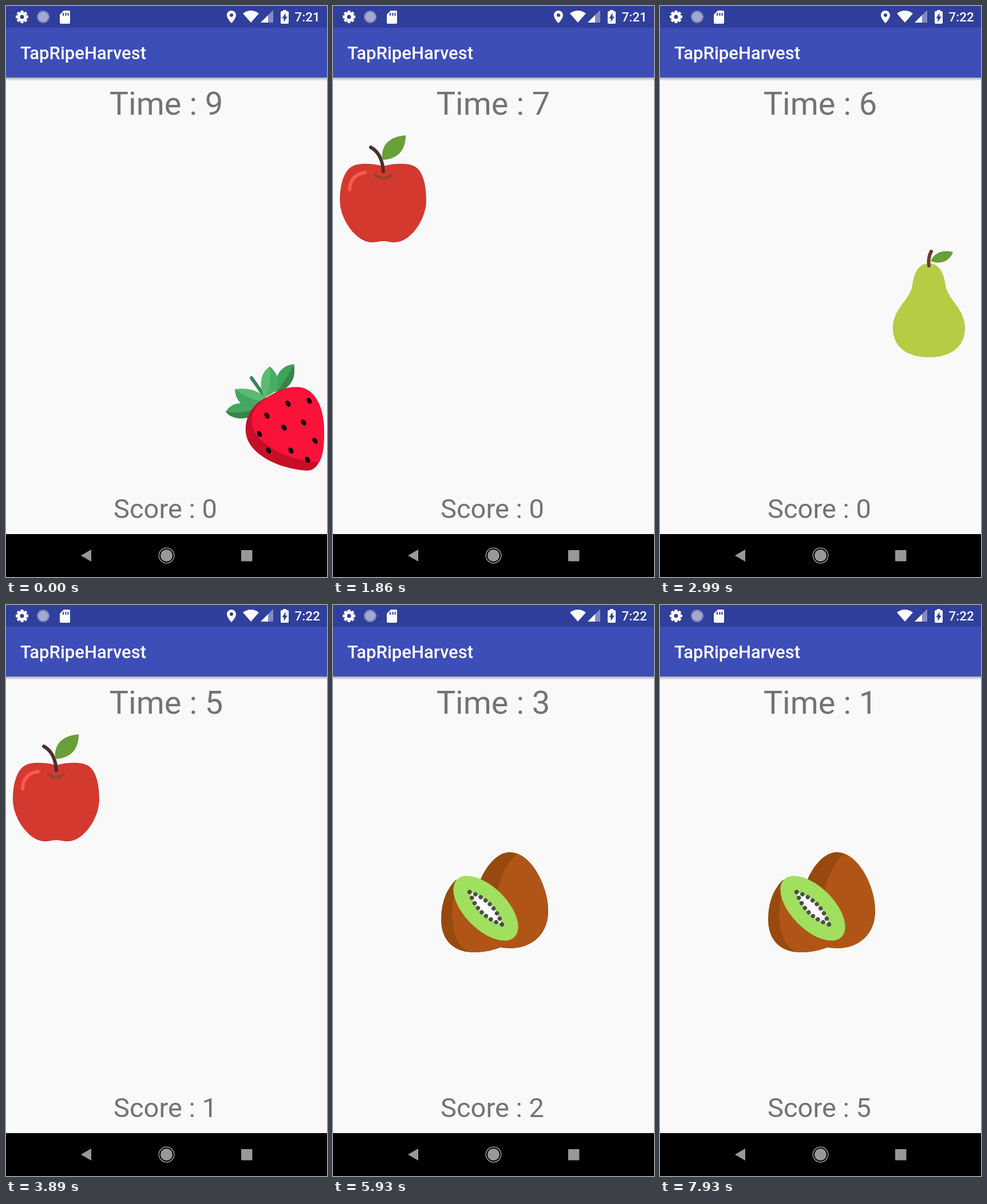
These frames come from a looping animation (561x998 px, 8 s). An HTML page:

```html
<!DOCTYPE html>
<html lang="en">
<head>
<meta charset="utf-8">
<title>Fruit tapping game</title>
<style>
  html, body { margin: 0; width: 100%; height: 100%; overflow: hidden; background: #f9f9fa; }
  svg { display: block; width: 100vw; height: 100vh; }
  text { font-family: Roboto, sans-serif; }
  .line { fill: none; stroke-linecap: round; }
  .fruit { display: none; }
</style>
</head>
<body>
<svg viewBox="0 0 561 998">
  <defs>
    <linearGradient id="shade" x2="0" y2="1">
      <stop offset="0" stop-color="#000" stop-opacity=".3"/>
      <stop offset="1" stop-color="#000" stop-opacity="0"/>
    </linearGradient>
  </defs>
  <rect width="561" height="998" fill="#f9f9fa"/>
  <rect y="125" width="561" height="6" fill="url(#shade)"/>
  <rect width="561" height="125" fill="#3d4eb8"/>
  <rect width="561" height="38" fill="#303f9b"/>

  <g id="status" fill="#fff">
    <g id="gear" transform="translate(28 19)">
      <circle r="6" fill="none" stroke="#fff" stroke-width="5"/>
    </g>
    <circle cx="65" cy="19" r="9" fill="#a3aace"/>
    <circle cx="65" cy="19" r="10" fill="none" stroke="#d6d9e9" stroke-width="1.6" stroke-dasharray="1.6 1.4"/>
    <path d="M101 8H110Q112 8 112 10V29Q112 31 110 31H96Q94 31 94 29V15Z"/>
    <path d="M100 12v5M104.500 12v5M108.500 12v5" stroke="#303f9b" stroke-width="2"/>
    <path id="pin" fill-rule="evenodd" d="M394 8C389 8 386 12 386 16C386 22 394 30 394 30S402 22 402 16C402 12 399 8 394 8ZM394 13a3 3 0 1 1 0 6a3 3 0 1 1 0-6Z"/>
    <path d="M414 13Q428 3 442 13L428 29Z"/>
    <path d="M467 7V29H445Z" opacity=".4"/>
    <path d="M458 16V29H445Z"/>
    <path d="M484 7h6v2h2q2 0 2 2v18q0 2-2 2h-10q-2 0-2-2v-18q0-2 2-2h2Z"/>
    <path d="M488.500 12V18.500H492L485.500 28V21.500H482.500Z" fill="#303f9b"/>
    <text id="clock" x="504.500" y="27" font-size="22.500" font-weight="500"></text>
  </g>
  <text x="25" y="93" font-size="31" font-weight="500" fill="#fff">TapRipeHarvest</text>

  <g fill="#737373" text-anchor="middle">
    <text id="time" x="280" y="190" font-size="56"></text>
    <text id="score" x="278.500" y="895" font-size="47"></text>
  </g>

  <g id="apple" class="fruit">
    <path fill="#d3392f" d="M88 280C70 275 45 274 34 280C18 288 12 315 12 340C12 372 40 413 68 413C78 413 80 411 88 411C96 411 98 413 108 413C136 413 163 372 163 340C163 315 158 288 142 280C130 274 105 275 88 280Z"/>
    <g class="line" stroke-width="6">
      <path stroke="#ff594f" d="M29 321Q30 295 56 291"/>
      <path stroke="#98432f" stroke-width="5" d="M74 296Q88 306 101 296"/>
      <path stroke="#4b2e2a" d="M66 247Q86 258 88 289"/>
    </g>
    <path fill="#689f38" d="M86 269C83 240 102 228 127 226C127 250 115 268 86 269Z"/>
  </g>

  <g id="strawberry" class="fruit">
    <path class="line" stroke="#388558" stroke-width="6" d="M429 650L449 678"/>
    <path fill="#3fa35c" d="M470 675C468 640 485 628 503 626C507 645 500 662 486 670Z"/>
    <path fill="#368549" d="M503 626C507 645 500 662 486 670L474 674Q490 652 503 626Z"/>
    <path fill="#44a660" d="M384 709C395 692 415 690 434 702L424 719C408 723 392 720 384 709Z"/>
    <path fill="#368549" d="M384 709Q410 713 432 706L424 719C408 723 392 720 384 709Z"/>
    <path fill="#58bd6e" d="M400 670C425 665 445 675 457 686L430 704C412 700 402 690 400 670Z"/>
    <path fill="#44a660" d="M400 670Q425 688 448 691L430 704C412 700 402 690 400 670Z"/>
    <path fill="#58bd6e" d="M461 630C475 642 482 660 468 675L452 685C440 660 446 640 461 630Z"/>
    <path fill="#48ad65" d="M461 630C475 642 482 660 468 675L456 682Q464 655 461 630Z"/>
    <path fill="#c50f28" d="M456 684C430 695 417 720 419 745C422 780 470 808 525 812C545 813 556 790 556 745C556 700 540 668 510 666C485 665 470 676 456 684Z"/>
    <path fill="#fa1238" d="M458 684C430 700 425 722 433 742C448 772 500 795 547 798C555 785 556 765 556 745C556 700 540 668 510 666C485 666 472 676 458 684Z"/>
    <g id="seeds"></g>
  </g>

  <g id="orange" class="fruit">
    <circle cx="90.500" cy="726" r="87" fill="#ea8c1f"/>
    <g id="spots" fill="#f2751d"></g>
    <path class="line" stroke="#94591a" stroke-width="6.500" d="M102 668L121 682M101 680L118 668"/>
    <path fill="#67a035" d="M116 671C125 640 145 622 185 627C180 650 160 676 116 671Z"/>
    <path class="line" stroke="#84bb4f" stroke-width="3.500" d="M119 669Q135 647 167 639"/>
  </g>

  <g id="grapes" class="fruit">
    <path class="line" stroke="#7c3b2a" stroke-width="7" style="stroke-linecap:butt" d="M162 430Q160 480 116 487"/>
    <path fill="#88c057" d="M149 474C172 472 189 490 189 513C165 512 150 495 149 474Z"/>
    <g id="berries"></g>
  </g>

  <g id="kiwi" class="fruit">
    <path fill="#984a0e" d="M309 432C345 432 376 490 376 535C376 575 348 600 309 600C275 600 245 580 245 535C245 490 275 432 309 432Z"/>
    <path fill="#b05517" d="M323 435C352 446 376 495 376 535C376 575 348 600 309 600C290 600 283 580 283 545C283 500 297 453 323 435Z"/>
    <path fill="#984a0e" d="M215 480C195 500 189 525 189 550C189 590 215 607 245 607C275 607 295 600 320 582Z"/>
    <path fill="#b05517" d="M217 492C207 515 206 545 212 570C217 590 225 600 240 607C275 608 300 598 322 582Z"/>
    <g id="slice" transform="translate(267 530) rotate(45)">
      <ellipse rx="71" ry="37" fill="#a1df5f"/>
      <path fill="#fbfaf8" d="M-40 0Q0-22 40 0Q0 22-40 0Z"/>
    </g>
  </g>

  <g id="pear" class="fruit">
    <path fill="#b5cc45" d="M470 450C488 450 496 466 499 488C503 514 533 528 533 563C533 596 508 614 470 614C432 614 407 596 407 563C407 528 437 514 441 488C444 466 452 450 470 450Z"/>
    <path class="line" stroke="#65402d" stroke-width="6" d="M470 454Q468 440 474 429"/>
    <path fill="#689f38" d="M473 446C480 430 495 426 512 430C506 447 490 452 473 446Z"/>
  </g>

  <rect y="923" width="561" height="75"/>
  <g fill="#989898">
    <path d="M131 960.500L149 950V971Z"/>
    <circle cx="280.500" cy="960.500" r="10.500"/>
    <circle cx="280.500" cy="960.500" r="13.300" fill="none" stroke="#989898" stroke-width="1.500"/>
    <rect x="411" y="951" width="19.500" height="19.500" rx="1"/>
  </g>
</svg>
<script>
const $ = id => document.getElementById(id);

function add(parent, tag, attrs) {
  const el = document.createElementNS("http://www.w3.org/2000/svg", tag);
  for (const key in attrs) el.setAttribute(key, attrs[key]);
  $(parent).append(el);
}

for (let a = 0; a < 360; a += 45)
  add("gear", "rect", { x: -2.5, y: -11, width: 5, height: 4, transform: `rotate(${a})` });

const seeds = [[456, 716], [493, 695], [530, 690], [486, 737], [520, 728],
  [443, 748], [540, 760], [459, 777], [498, 777], [527, 793]];
for (const [x, y] of seeds)
  add("seeds", "ellipse", { rx: 3.8, ry: 5.8, transform: `translate(${x} ${y}) rotate(-35)` });

const spots = [[50, 675], [75, 664], [140, 693], [158, 711], [137, 726], [160, 733], [140, 751]];
for (const [cx, cy] of spots) add("spots", "circle", { cx, cy, r: 7.3 });

const tones = ["#6a56a5", "#9575a8", "#583c62"];
const berries = [[48, 483, 0], [86, 482, 1], [129, 526, 2], [106, 502, 0], [35, 519, 2],
  [69, 515, 0], [96, 540, 2], [62, 545, 1], [28, 559, 0], [123, 560, 1],
  [89, 573, 0], [55, 583, 2], [22, 590, 1]];
for (const [cx, cy, tone] of berries)
  add("berries", "circle", { cx, cy, r: 20, fill: tones[tone] });

for (let u = -40; u <= 40; u += 10)
  for (const side of [-1, 1])
    add("slice", "circle", { cx: u, cy: side * 10 * (1 - (u / 40) ** 2), r: 3.7, fill: "#4d4d4d" });

// Each track lists [start in ms, value].
const tracks = {
  fruit: [[0, "strawberry"], [1430, "apple"], [2420, "kiwi"], [2990, "pear"], [3890, "apple"],
    [4430, "orange"], [5450, "apple"], [5930, "kiwi"], [6430, "grapes"], [7450, "kiwi"]],
  time: [[0, 9], [380, 8], [1380, 7], [2420, 6], [3380, 5], [4380, 4], [5410, 3], [6380, 2], [7400, 1]],
  score: [[0, 0], [3380, 1], [4830, 2], [6510, 3], [6910, 4], [7930, 5]],
  clock: [[0, "7:21"], [2470, "7:22"]],
  pin: [[0, "inline"], [4920, "none"]]
};
const LOOP = 8000;
const valueAt = (name, t) => tracks[name].findLast(([start]) => start <= t)[1];
const fruits = document.querySelectorAll(".fruit");

function draw(t) {
  const current = valueAt("fruit", t);
  for (const el of fruits) el.style.display = el.id === current ? "inline" : "none";
  $("time").textContent = "Time : " + valueAt("time", t);
  $("score").textContent = "Score : " + valueAt("score", t);
  $("clock").textContent = valueAt("clock", t);
  $("pin").style.display = valueAt("pin", t);
}

const begin = performance.now();
function tick() {
  draw((performance.now() - begin) % LOOP);
  requestAnimationFrame(tick);
}
tick();
</script>
</body>
</html>
```
